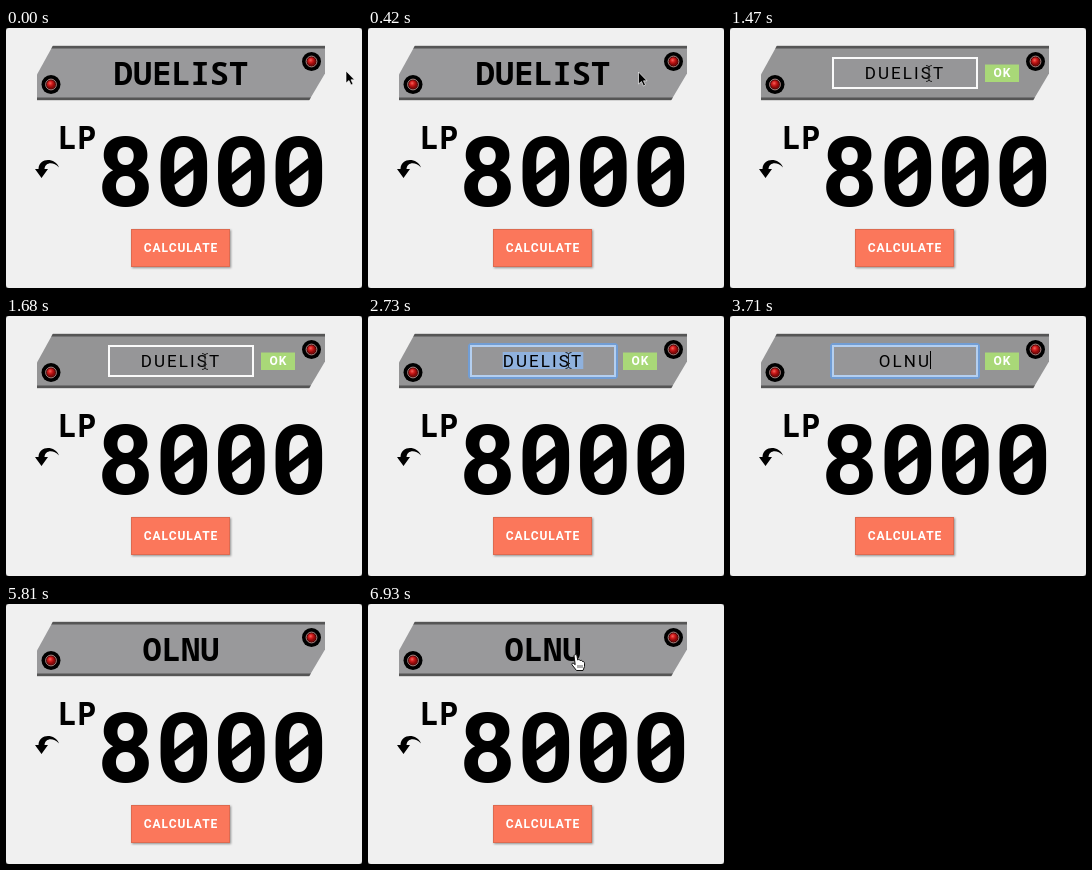
Write an HTML page that moves like this. It is 356 by 260 pixels and loops after 7 s.

```html
<!DOCTYPE html>
<html lang="en">
<head>
<meta charset="utf-8">
<title>Duelist life points</title>
<style>
  html, body { margin: 0; width: 100%; height: 100%; overflow: hidden; background: #f0f0f0; }
  svg { display: block; width: 356px; height: 260px; }
  .mono { font-family: "Roboto Mono", "Noto Sans Mono", monospace; font-weight: 700; font-size: 32px; }
  .sans { font-family: Roboto, sans-serif; }
  .mid { text-anchor: middle; }
  .points { font-size: 97px; font-weight: 700; }
  .field { font-size: 17px; letter-spacing: 2.1px; }
  .label { font-size: 12px; font-weight: 700; fill: #fff; letter-spacing: .95px; }
  .button { filter: drop-shadow(1.5px 1.5px 1px #0006); }
  .cursor { stroke-width: 1; stroke-linejoin: round; }
</style>
</head>
<body>
<svg viewBox="0 0 356 260">
  <defs>
    <clipPath id="plate"><path d="M47 17H319V45L303 72H31V46Z"/></clipPath>
    <radialGradient id="red" cx=".4" cy=".35">
      <stop offset="0" stop-color="#f4645c"/>
      <stop offset=".5" stop-color="#d01c1c"/>
      <stop offset="1" stop-color="#8c0a0a"/>
    </radialGradient>
    <g id="screw">
      <circle r="9.5"/>
      <circle r="5.4" fill="#3a0606" stroke="#c9a5a1" stroke-width=".8"/>
      <circle r="4.3" fill="url(#red)"/>
    </g>
    <path id="slash" d="M-12 9.500L12 -9.500" stroke="#000" stroke-width="9.500"/>
  </defs>

  <rect width="356" height="260" fill="#f0f0f0"/>
  <path d="M0 0H3Q0 0 0 3ZM356 0V3Q356 0 353 0ZM0 260V257Q0 260 3 260ZM356 260H353Q356 260 356 257Z" fill="#333"/>

  <g transform="translate(0 .5)">
    <g clip-path="url(#plate)">
      <rect id="panel" x="31" y="17" width="288" height="55"/>
      <path d="M31 18.500H319M31 70.500H319" stroke="#555" stroke-width="3"/>
    </g>
  </g>
  <use href="#screw" x="45" y="56.500"/>
  <use href="#screw" x="305.500" y="33.500"/>

  <text id="title" class="mono mid" x="175" y="57"></text>

  <g id="editor">
    <rect id="ring" x="101.500" y="28.500" width="147" height="33" rx="2" fill="none" stroke="#6c9fe0" stroke-opacity=".85" stroke-width="3"/>
    <rect id="box" x="103" y="30" width="144" height="30" fill="#969698" stroke-width="2"/>
    <rect id="selection" y="36" height="17" fill="#8fb1dd"/>
    <text id="field" class="sans field mid" x="175" y="50.500"></text>
    <rect id="caret" y="35" width="1" height="18"/>
    <rect x="255" y="36.500" width="34" height="17.500" fill="#a9d878"/>
    <text class="sans label mid" x="272.400" y="49.300">OK</text>
  </g>

  <text class="mono" x="51.800" y="121.300">LP</text>
  <text class="sans points mid" x="119.500 177.800 235.300 292.800" y="178">8000</text>
  <use href="#slash" x="177.800" y="143.500"/>
  <use href="#slash" x="235.300" y="143.500"/>
  <use href="#slash" x="292.800" y="143.500"/>
  <path d="M53 139.500C49.500 129.500 33 129 32.500 141H29L35.500 150L42 141H38.500C39 134.500 47 133 53 139.500Z"/>

  <rect class="button" x="125.500" y="201.500" width="98" height="37" fill="#fb775b" stroke="#dd6a50"/>
  <text class="sans label mid" x="175" y="224">CALCULATE</text>

  <g id="arrow" class="cursor">
    <path d="M0 0V12L3 9.500L5 14L7 13L5 8.800H8.500Z" stroke="#fff" stroke-opacity=".8" stroke-width=".8"/>
  </g>
  <g id="hand" class="cursor">
    <path d="M3 1.800C3 .200 5.800 .200 6 1.800L6.700 6C7.500 5.200 9 5.500 9.200 6.600C10.200 6 11.400 6.500 11.500 7.500C12.600 7.200 13.500 8 13.500 9.200V12.500L12 16.500H5.500L1 10.800C.300 9.500 1.800 8.600 2.800 9.500L4.200 10.700Z" fill="#fff" stroke="#111"/>
    <path d="M7 11V14M9 11V14M11 11V14" stroke="#333" stroke-width=".8"/>
  </g>
  <g id="ibeam" class="cursor">
    <path d="M-3 -8Q0 -8 0 -6Q0 -8 3 -8M0 -6V6M-3 8Q0 8 0 6Q0 8 3 8M-1.500 3H1.500" fill="none" stroke="#222"/>
  </g>
</svg>

<script>
const LOOP = 7000, STEP = 70, CENTER = 175;
const OLD_NAME = 'DUELIST', NEW_NAME = 'OLNU';
const KEY_TIMES = [3290, 3500, 3640, 3710];
const el = id => document.getElementById(id);
const parts = Object.fromEntries(
  ['panel', 'title', 'editor', 'ring', 'box', 'selection', 'field', 'caret', 'arrow', 'hand', 'ibeam']
    .map(id => [id, el(id)]));

const show = (id, on) => parts[id].setAttribute('visibility', on ? 'inherit' : 'hidden');
const between = (t, a, b) => t >= a && t < b;

// Eased position along a straight move from one point to another.
function glide(t, start, end, from, to) {
  const p = Math.min(1, Math.max(0, (t - start) / (end - start)));
  const k = p * p * (3 - 2 * p);
  return from.map((v, i) => v + (to[i] - v) * k);
}

function pointer(t) {
  if (t < 840) {
    const pos = glide(t, 0, 840, [340, 43], [201, 45]);
    return pos[0] < 242 ? ['hand', [pos[0] - 5, pos[1]]] : ['arrow', pos];
  }
  if (t < 1400) return ['hand', glide(t, 840, 1190, [196, 44.5], [194.5, 45.5])];
  if (t < 3150) return ['ibeam', glide(t, 1960, 2450, [199, 45.5], [200.5, 44.5])];
  if (t >= 6300) return ['hand', glide(t, 6230, 6930, [195, 45], [203, 50])];
  return [];
}

function render(t) {
  const editing = between(t, 1400, 5110);
  const focused = t >= 1960;
  const selected = between(t, 2660, 3150);
  const typed = NEW_NAME.slice(0, KEY_TIMES.filter(k => t >= k).length);

  parts.panel.setAttribute('fill', editing ? '#949495' : '#99999b');
  parts.title.textContent = t < 5110 ? OLD_NAME : NEW_NAME;
  show('title', !editing);
  show('editor', editing);

  if (editing) {
    parts.field.textContent = t < 3150 ? OLD_NAME : typed;
    const width = parts.field.textContent ? parts.field.getComputedTextLength() : 0;
    parts.selection.setAttribute('x', CENTER - width / 2);
    parts.selection.setAttribute('width', width);
    parts.caret.setAttribute('x', Math.round(CENTER + width / 2) - 1);
    parts.box.setAttribute('stroke', focused ? '#b4cff0' : '#fafafa');
  }
  show('ring', editing && focused);
  show('selection', editing && selected);
  show('caret', editing && t >= 3150 && !between(t, 4200, 4760));

  const [kind, pos] = pointer(t);
  for (const id of ['arrow', 'hand', 'ibeam']) show(id, id === kind);
  if (kind) parts[kind].setAttribute('transform', `translate(${pos})`);
}

const begin = performance.now();
function tick() {
  const t = (performance.now() - begin) % LOOP;
  render(Math.floor(t / STEP) * STEP);
  requestAnimationFrame(tick);
}
tick();
</script>
</body>
</html>
```
